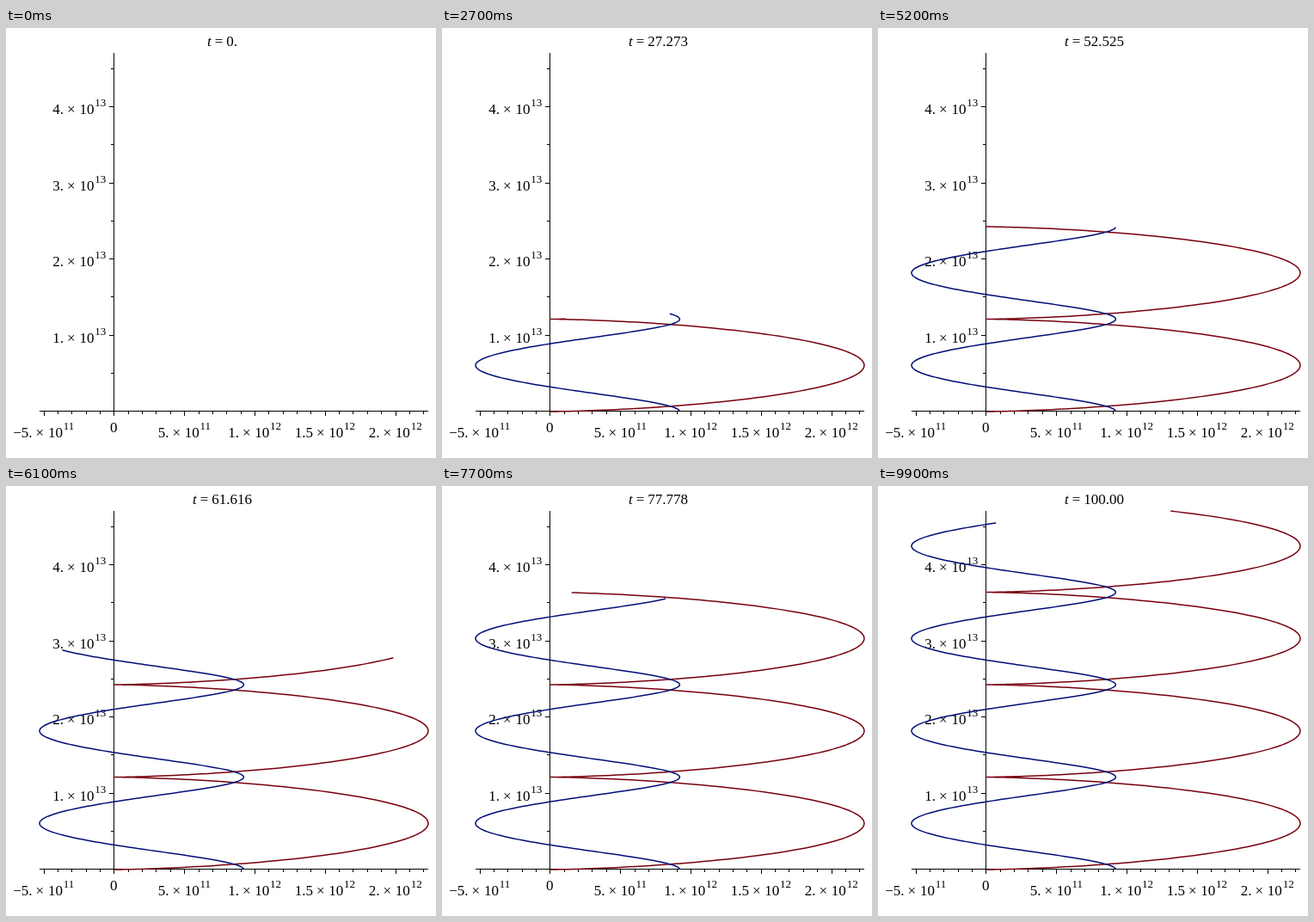
Animation of 500 by 500 pixels, one loop 10 s. Source, as an HTML page:

```html
<!DOCTYPE html>
<html lang="en">
<head>
<meta charset="utf-8">
<title>Two orbiting bodies</title>
<style>
html, body { margin: 0; width: 100%; height: 100%; overflow: hidden; background: #fff; }
svg { display: block; }
text { font: 17px "Liberation Serif", "Times New Roman", serif; fill: #000; }
.sup { font-size: 13px; }
.var { font-style: italic; }
.axes { stroke: #000; fill: none; }
.orbit { fill: none; stroke-width: 1.5; stroke-linejoin: round; }
</style>
</head>
<body>
<svg width="500" height="500" viewBox="0 0 500 500">
  <g id="labels"></g>
  <path class="axes" id="axes"/>
  <path class="orbit" id="red" stroke="#78000e"/>
  <path class="orbit" id="blue" stroke="#000e78"/>
  <text x="251.5" y="21" text-anchor="middle"><tspan class="var">t</tspan><tspan dx="4">=</tspan><tspan dx="4" id="time">0.</tspan></text>
</svg>
<script>
const $ = id => document.getElementById(id);

// Plot geometry
const X0 = 125.84, Y0 = 446, XSTEP = 81.8, YSTEP = 88.5;
const LEFT = 39, RIGHT = 491, TOP = 29;
const snap = v => Math.floor(v) + 0.5;

// Binary orbit: eccentricity, period, drift per time unit
const ECC = 0.5, PERIOD = 26.312, DRIFT = 4.085;
const STEPS = 99, STEP_MS = 100, T_END = 100;
const bodies = [
  { path: $("red"), x: X0, ax: 182.55, ay: -8.53 },
  { path: $("blue"), x: 276.4, ax: -118.7, ay: 5.54 }
];

function label(x, y, anchor, mantissa, power) {
  return `<text x="${x}" y="${y}" text-anchor="${anchor}">${mantissa}` +
    `<tspan dx="4">×</tspan><tspan dx="4.7">10</tspan>` +
    `<tspan class="sup" dx="0.8" dy="-9">${power}</tspan></text>`;
}

function drawAxes() {
  const ax = snap(X0 - 0.5), ay = snap(Y0 - 0.5);
  let d = `M${LEFT} ${ay}H${RIGHT}M${ax} ${TOP}V${ay}`;
  for (let i = -5; i <= 22; i++) {
    d += `M${snap(X0 + i * XSTEP / 5)} ${ay}v${i % 5 ? 3.5 : 5.5}`;
  }
  for (let i = 0; i <= 9; i++) {
    d += `M${ax} ${snap(Y0 - 0.5 - i * YSTEP / 2)}h${i % 2 ? -3.5 : -5.5}`;
  }
  $("axes").setAttribute("d", d);

  let html = `<text x="125.3" y="469.5" text-anchor="middle">0</text>`;
  for (let i = 1; i <= 4; i++) {
    html += label(116.2, Y0 - i * YSTEP + 8, "end", i + ".", 13);
  }
  [[-1, "−5.", 11], [1, "5.", 11], [2, "1.", 12], [3, "1.5", 12], [4, "2.", 12]]
    .forEach(([i, m, p]) => {
      html += label(X0 + i * XSTEP - 0.3, 475.5, "middle", m, p);
    });
  $("labels").innerHTML = html;
}

// Kepler's equation by Newton iteration
function anomaly(t) {
  const mean = 2 * Math.PI * t / PERIOD;
  let E = mean + ECC * Math.sin(mean);
  for (let i = 0; i < 8; i++) {
    E -= (E - ECC * Math.sin(E) - mean) / (1 - ECC * Math.cos(E));
  }
  return E;
}

function orbitPath(body, endE) {
  const n = Math.ceil(endE * 20);
  let d = "";
  for (let i = 0; n && i <= n; i++) {
    const E = endE * i / n;
    const t = (E - ECC * Math.sin(E)) * PERIOD / (2 * Math.PI);
    const x = body.x + body.ax * (1 - Math.cos(E));
    const y = Y0 - DRIFT * t - body.ay * Math.sin(E);
    d += `${i ? "L" : "M"}${x.toFixed(2)} ${y.toFixed(2)}`;
  }
  return d;
}

let shown = -1;
function frame() {
  const k = Math.floor(performance.now() / STEP_MS) % (STEPS + 1);
  if (k !== shown) {
    shown = k;
    const t = k * T_END / STEPS;
    const E = anomaly(t);
    bodies.forEach(b => b.path.setAttribute("d", orbitPath(b, E)));
    $("time").textContent = k ? t.toPrecision(5) : "0.";
  }
  requestAnimationFrame(frame);
}

drawAxes();
frame();
</script>
</body>
</html>
```
